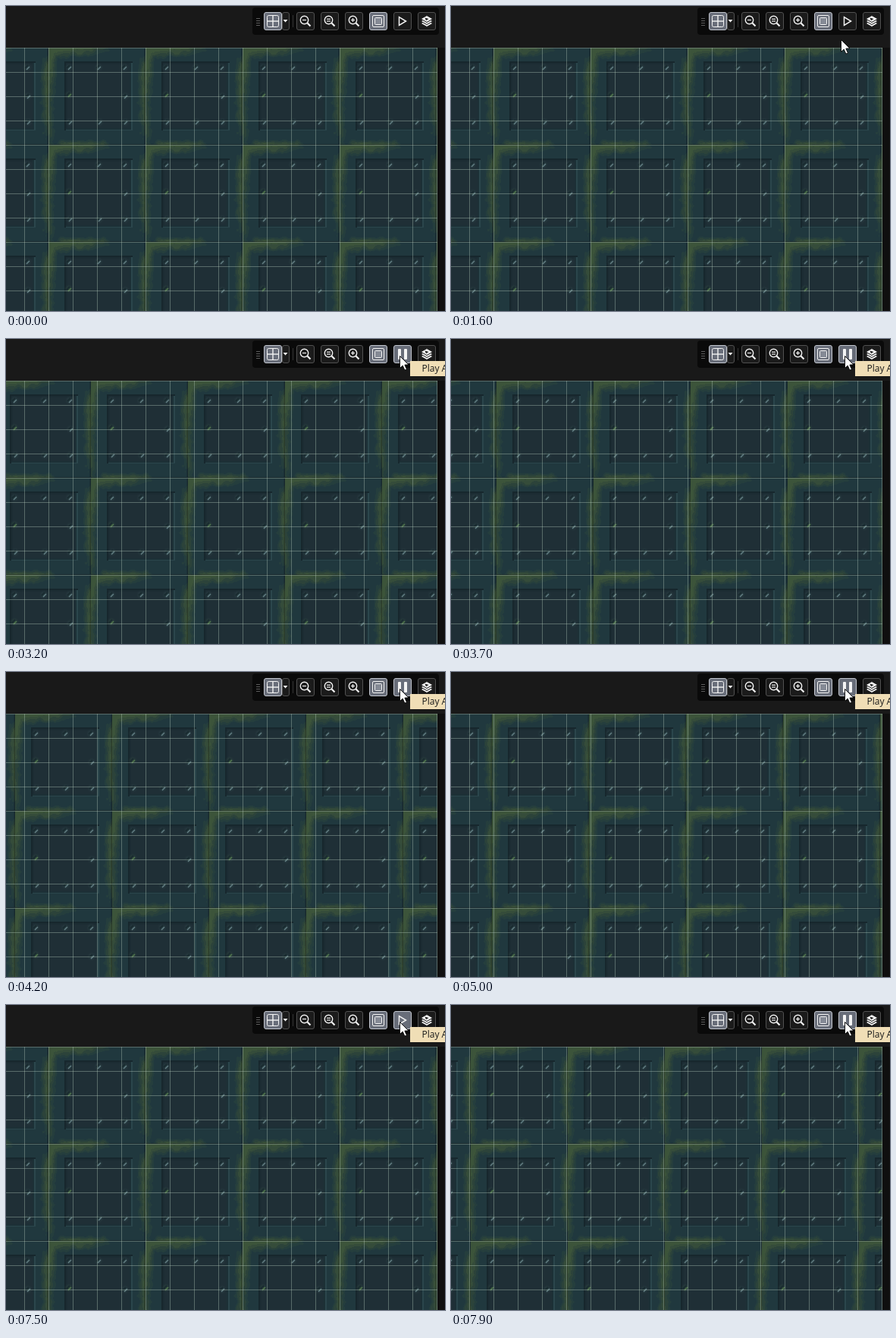
Recreate the animation shown at these times as an HTML page with a canvas. Size 579x402 px, loop 8 s.

```html
<!DOCTYPE html>
<html lang="en">
<head>
<meta charset="utf-8">
<title>Tile animation preview</title>
<style>
html, body { margin: 0; width: 100%; height: 100%; overflow: hidden; background: #191919; }
canvas { display: block; }
</style>
</head>
<body>
<canvas id="stage" width="579" height="402"></canvas>
<script>
const W = 579, H = 402, LOOP = 8000, STEP = 100;
const TILE = 128, TOP = 55, RIGHT = 569;
const ctx = document.getElementById('stage').getContext('2d');

const clamp = (v, a = 0, b = 1) => Math.min(b, Math.max(a, v));
const smooth = (a, b, v) => { const k = clamp((v - a) / (b - a)); return k * k * (3 - 2 * k); };

// Linear interpolation through [time, value] pairs.
function along(keys, t) {
  if (t <= keys[0][0]) return keys[0][1];
  for (let i = 1; i < keys.length; i++) {
    const [a, u] = keys[i - 1], [b, v] = keys[i];
    if (t <= b) return u + (v - u) * (t - a) / (b - a);
  }
  return keys[keys.length - 1][1];
}

function hash(x, y) {
  const s = Math.sin(x * 127.1 + y * 311.7) * 43758.5453;
  return s - Math.floor(s);
}

// Value noise that wraps at the tile edge.
function noise(x, y, cell) {
  const n = TILE / cell, gx = x / cell, gy = y / cell;
  const ix = Math.floor(gx), iy = Math.floor(gy);
  const fx = smooth(0, 1, gx - ix), fy = smooth(0, 1, gy - iy);
  const at = (i, j) => hash((i % n) + cell, (j % n) + cell);
  const a = at(ix, iy) * (1 - fx) + at(ix + 1, iy) * fx;
  const b = at(ix, iy + 1) * (1 - fx) + at(ix + 1, iy + 1) * fx;
  return a * (1 - fy) + b * fy;
}

function mossAt(x, y) {
  const edge = (d, w) => clamp(1 - d / w);
  const wob = noise(x, y, 8) * 0.6 + noise(x, y, 4) * 0.4;
  const top = edge(y, 17) * (1 - smooth(42, 98, x) * 0.85);
  const left = edge(x, 15) * (1 - smooth(20, 80, y) * 0.4);
  const right = edge(127 - x, 14) * smooth(0, 24, y) * (1 - smooth(72, 122, y) * 0.7) * 0.95;
  const bottom = edge(127 - y, 9) * smooth(0, 22, x) * (1 - smooth(60, 98, x)) * 0.9;
  const corner = Math.exp(-(x * x + y * y) / 420) * 0.35;
  return Math.max(top, left, right, bottom) + corner + (wob - 0.5) * 0.42;
}

const MOSS = [
  [0.86, [60, 84, 58]],
  [0.66, [53, 76, 58]],
  [0.48, [44, 67, 58]],
  [0.32, [37, 62, 61]]
];

function frameColor(x, y) {
  const m = mossAt(x, y);
  const band = MOSS.find(b => m > b[0]);
  let c = band ? band[1] : [32, 56, 62];
  if (x === 127 || y === 127) c = c.map(v => v * 0.72);
  else if (x === 126 || y === 0) c = c.map(v => v * 0.88);
  return c;
}

function tileColor(x, y) {
  const l = 21, r = 110, t = 18, b = 108;
  if (x < l || x > r || y < t || y > b) return frameColor(x, y);
  if (y < t + 2 || x < l + 2) return [23, 39, 45];
  if (x > r - 2 || y > b - 1) return [43, 70, 76];
  if (x > r - 4 || y > b - 3) return [28, 48, 54];
  if (x < l + 4 || y < t + 4) return [28, 44, 51];
  return [31, 47, 54];
}

function rivet(g, x, y, mossy) {
  const glow = g.createRadialGradient(x, y, 0, x, y, 6);
  glow.addColorStop(0, mossy ? 'rgba(62,92,62,.7)' : 'rgba(58,84,88,.6)');
  glow.addColorStop(1, 'rgba(45,66,70,0)');
  g.fillStyle = glow;
  g.fillRect(x - 6, y - 6, 12, 12);
  const streak = (dx, dy, color, w) => {
    g.strokeStyle = color;
    g.lineWidth = w;
    g.beginPath();
    g.moveTo(x - 2 + dx, y + 2 + dy);
    g.lineTo(x + 2 + dx, y - 2 + dy);
    g.stroke();
  };
  streak(-1, -1, '#192b30', 2);
  streak(1, 1, mossy ? '#52794f' : '#648085', 1.3);
}

function makeTile() {
  const c = document.createElement('canvas');
  c.width = c.height = TILE;
  const g = c.getContext('2d'), img = g.createImageData(TILE, TILE);
  for (let y = 0; y < TILE; y++) {
    for (let x = 0; x < TILE; x++) {
      const [r, gr, b] = tileColor(x, y), i = (y * TILE + x) * 4;
      img.data[i] = r;
      img.data[i + 1] = gr;
      img.data[i + 2] = b;
      img.data[i + 3] = 255;
    }
  }
  g.putImageData(img, 0, 0);
  for (const x of [27, 66, 100]) {
    rivet(g, x, 26);
    rivet(g, x + 1, 98);
  }
  rivet(g, 27, 62, true);
  rivet(g, 101, 64);
  return c;
}

const tile = makeTile();

function drawRoom(shift) {
  ctx.save();
  ctx.beginPath();
  ctx.rect(0, TOP, RIGHT, H - TOP);
  ctx.clip();
  const start = ((56 - shift) % TILE + TILE) % TILE - TILE;
  for (let y = TOP; y < H; y += TILE)
    for (let x = start; x < RIGHT; x += TILE) ctx.drawImage(tile, x, y);
  ctx.fillStyle = 'rgba(190,212,198,.36)';
  for (let x = 24; x < RIGHT; x += 32) ctx.fillRect(x, TOP, 1, H - TOP);
  for (let y = TOP; y < H; y += 32) ctx.fillRect(0, y, RIGHT, 1);
  ctx.restore();
  ctx.fillStyle = '#0f0f0f';
  ctx.fillRect(RIGHT, TOP, W - RIGHT, H - TOP);
}

function box(x, y, w, h, r, fill, line) {
  ctx.beginPath();
  ctx.roundRect(x, y, w, h, r);
  if (fill) { ctx.fillStyle = fill; ctx.fill(); }
  if (line) { ctx.strokeStyle = line; ctx.lineWidth = 1; ctx.stroke(); }
}

const LOOK = {
  off: ['#1b1b1b', '#505050'],
  hover: ['#3a3f49', '#9a9ea6'],
  on: ['#686d79', '#c3c7cf']
};

const button = (x, look, w = 23) => box(x + 0.5, 8.5, w, 23, 2.5, ...LOOK[look]);

function path(points, close) {
  ctx.beginPath();
  points.forEach(([x, y]) => ctx.lineTo(x, y));
  if (close) ctx.closePath();
}

function line(points, width = 1.5, close = false) {
  path(points, close);
  ctx.strokeStyle = '#f4f4f4';
  ctx.lineWidth = width;
  ctx.stroke();
}

function shape(points, fill = '#f4f4f4') {
  path(points, true);
  ctx.fillStyle = fill;
  ctx.fill();
}

function lens(x, kind) {
  button(x, 'off');
  const cx = x + 10.5, cy = 18.5;
  ctx.beginPath();
  ctx.arc(cx, cy, 5.2, 0, Math.PI * 2);
  ctx.strokeStyle = '#f4f4f4';
  ctx.lineWidth = 1.4;
  ctx.stroke();
  line([[cx + 4, cy + 4], [cx + 8, cy + 8]], 2.2);
  const dash = y => line([[cx - 2.5, y], [cx + 2.5, y]], 1.2);
  if (kind === '=') { dash(cy - 1.3); dash(cy + 1.5); }
  else dash(cy);
  if (kind === '+') line([[cx, cy - 2.5], [cx, cy + 2.5]], 1.2);
}

function layersIcon(cx) {
  for (const y of [23, 20, 17]) {
    const d = [[cx - 8, y], [cx, y - 4.5], [cx + 8, y], [cx, y + 4.5]];
    shape(d);
    line(d, 0.1, true);
    path(d, true);
    ctx.strokeStyle = '#161616';
    ctx.lineWidth = 1;
    ctx.stroke();
  }
  line([[cx - 3, 15], [cx + 1, 17.5], [cx - 2, 19]], 0.1);
  shape([[cx - 2.5, 15.5], [cx + 2.5, 17], [cx - 1, 19]], '#161616');
}

function drawToolbar(look, paused) {
  box(325, 2, 246, 36, 4, '#0a0a0a');
  ctx.fillStyle = '#5c5c5c';
  for (let y = 16; y <= 25; y += 3) ctx.fillRect(330, y, 5, 1);

  button(340, 'on');
  box(344.5, 12.5, 15, 15, 2, null, '#f4f4f4');
  line([[352, 13], [352, 27]], 1.4);
  line([[345, 20], [359, 20]], 1.4);
  button(364, 'off', 9);
  shape([[365.5, 18], [371.5, 18], [368.5, 21.5]]);
  ctx.fillStyle = '#343434';
  ctx.fillRect(378, 12, 1, 16);

  lens(383, '-');
  lens(415, '=');
  lens(447, '+');

  button(479, 'on');
  box(483.5, 12.5, 15, 15, 1.5, null, '#f4f4f4');
  box(486.5, 15.5, 9, 9, 1, '#858a95', '#f4f4f4');

  button(511, look);
  if (paused) line([[518.5, 14.5], [518.5, 25.5], [527.5, 20]], 1.5, true);
  else {
    box(517, 13, 4, 14, 1, '#f4f4f4');
    box(525, 13, 4, 14, 1, '#f4f4f4');
  }

  button(543, 'off');
  layersIcon(555);
}

function drawTip() {
  box(533, 29, 60, 20, 0, '#f0deb6');
  ctx.fillStyle = '#1a1a1a';
  ctx.font = '12px "Open Sans", "Noto Sans", sans-serif';
  ctx.fillText('Play Animation', 548.5, 43);
}

function drawCursor(x, y) {
  ctx.save();
  ctx.translate(x + 0.5, y + 0.5);
  const arrow = [[0, 0], [0, 16], [3.7, 12.6], [6.4, 18.6], [9, 17.5], [6.4, 11.6], [11.5, 11.4]];
  shape(arrow, '#fff');
  path(arrow, true);
  ctx.strokeStyle = '#111';
  ctx.lineWidth = 1;
  ctx.stroke();
  ctx.restore();
}

const RUN = [[2500, 0], [2700, 20], [3700, 124], [4200, 172], [5000, 258], [5400, 300]];
const RERUN = [[7600, 0], [7900, 30]];
const DRIFT = [[0, 510], [900, 512], [1800, 515], [2300, 519]];

function buttonLook(t) {
  if (t < 1900) return 'off';
  if ((t >= 2400 && t < 5400) || t >= 7500) return 'on';
  return 'hover';
}

function draw(t) {
  const playing = (t >= 2500 && t < 5500) || t >= 7600;
  const raw = !playing ? 0 : along(t < 5500 ? RUN : RERUN, t);
  const shift = Math.round(raw / 2) * 2;

  ctx.fillStyle = '#191919';
  ctx.fillRect(0, 0, W, H);
  drawRoom(shift);
  drawToolbar(buttonLook(t), !playing);
  if (t >= 2300) drawTip();

  // The pointer slows down evenly until it rests on the play button.
  const rest = Math.max(0, 2102 - t);
  drawCursor(Math.round(along(DRIFT, t)), Math.round(22 + 8.77e-5 * rest * rest));
}

const begin = performance.now();
function tick() {
  const t = (performance.now() - begin) % LOOP;
  draw(Math.floor(t / STEP) * STEP);
  requestAnimationFrame(tick);
}
draw(0);
requestAnimationFrame(tick);
</script>
</body>
</html>
```
